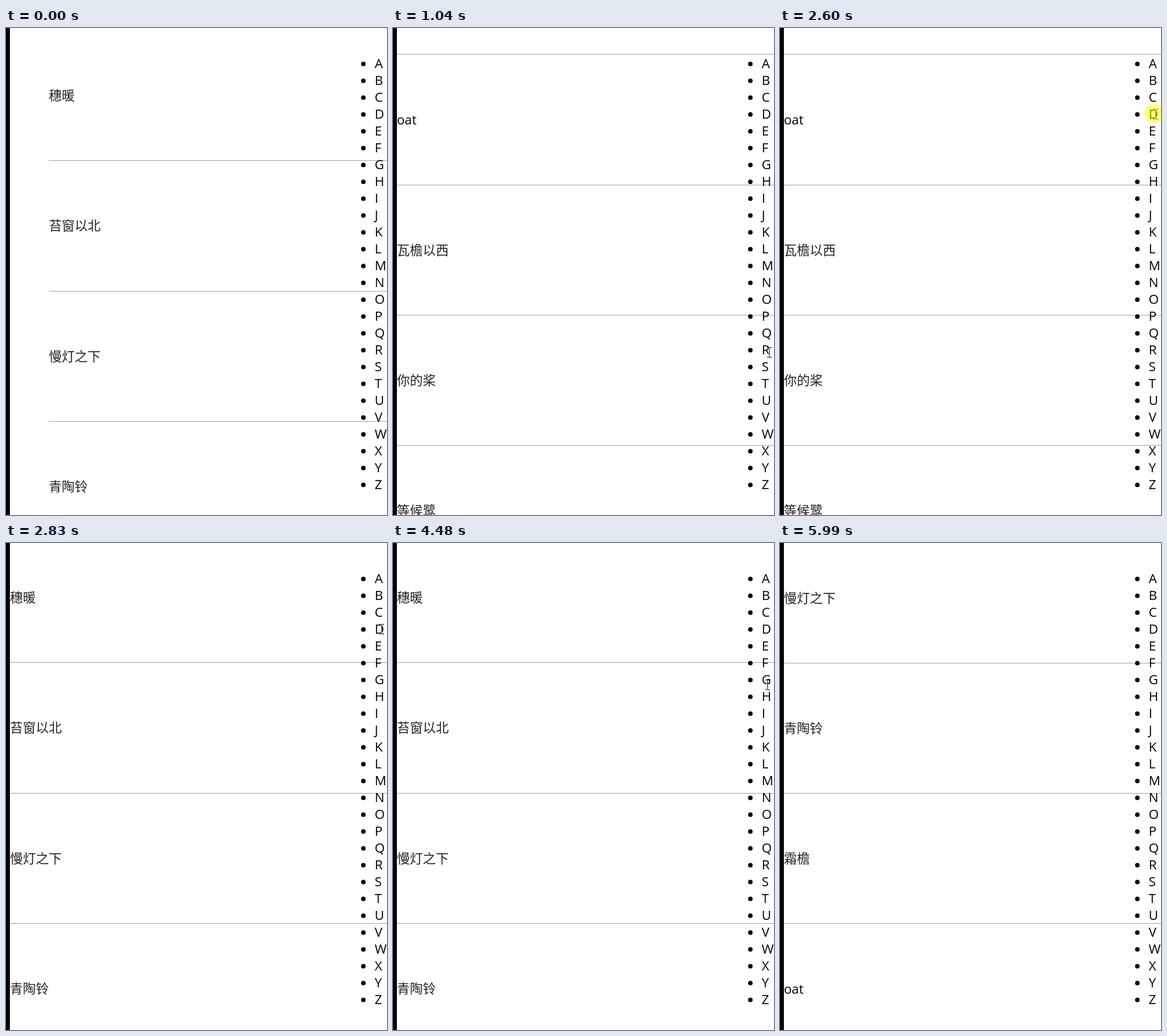
An HTML page that plays this animation: 588 by 752 pixels, repeating every 6290 ms.

```html
<!DOCTYPE html>
<html lang="zh-CN">
<head>
<meta charset="utf-8">
<title>Song index</title>
<style>
  html, body { margin: 0; width: 100%; height: 100%; overflow: hidden; background: #fff; }
  svg { display: block; width: 588px; height: 752px; }
  text { font: 20px "Open Sans", "Noto Sans CJK SC", "Noto Sans CJK", sans-serif; }
  .title { font-weight: 300; fill: #222; }
  .title:lang(en) { font-weight: 400; fill: #000; }
  .page, .click, .cursor { animation: 6290ms step-end infinite; }
  .page, .click { visibility: hidden; }
  .page0 { animation-name: page0; }
  .page1 { animation-name: page1; }
  .page2 { animation-name: page2; }
  .page3 { animation-name: page3; }
  .click { animation-name: click; fill: #ff0; fill-opacity: .5; }
  .cursor { animation-name: move; }
  .halo { fill: none; stroke: #fff; stroke-width: 2; }

  @keyframes page0 {
    0% { visibility: visible; }
    16.5%, 100% { visibility: hidden; }
  }
  @keyframes page1 {
    0%, 44.96%, 100% { visibility: hidden; }
    16.5% { visibility: visible; }
  }
  @keyframes page2 {
    0%, 82.64%, 100% { visibility: hidden; }
    44.96% { visibility: visible; }
  }
  @keyframes page3 {
    0%, 100% { visibility: hidden; }
    82.64% { visibility: visible; }
  }
  @keyframes click {
    0%, 16.5%, 44.96%, 82.64%, 100% { visibility: hidden; }
    14.12%, 41.3%, 79.94% { visibility: visible; }
  }
  @keyframes move {
    0% { transform: translate(700px, 501px); }
    5.37% { transform: translate(583.5px, 501px); }
    6.65% { transform: translate(582.5px, 503px); }
    9.03% { transform: translate(580.5px, 502px); }
    11.73% { transform: translate(580.5px, 501px); }
    23.81% { transform: translate(700px, 501px); }
    /* back in from the right edge */
    29.06% { transform: translate(588.5px, 210px); animation-timing-function: steps(4, start); }
    33.72% { transform: translate(585.5px, 124px); }
    35.26% { transform: translate(581.5px, 132px); }
    37.64% { transform: translate(580.5px, 132px); }
    38.92% { transform: translate(579.5px, 133px); }
    53.7% { transform: translate(578.5px, 133px); }
    /* down to G, past it and back */
    56.09% { transform: translate(578.5px, 133px); animation-timing-function: steps(8, start); }
    66.26% { transform: translate(576.5px, 216px); animation-timing-function: steps(3, start); }
    69.96% { transform: translate(576.5px, 233px); animation-timing-function: steps(2, start); }
    72.42% { transform: translate(577.5px, 219px); }
    73.89% { transform: translate(577.5px, 219px); animation-timing-function: steps(3, start); }
    77.47% { transform: translate(578.5px, 236px); }
    /* out at the bottom */
    87.4% { transform: translate(578.5px, 236px); animation-timing-function: steps(3, start); }
    91.3% { transform: translate(560.5px, 420px); animation-timing-function: steps(3, start); }
    95.19% { transform: translate(516.5px, 745px); }
    95.2%, 100% { transform: translate(700px, 800px); }
  }
</style>
</head>
<body>
<svg viewBox="0 0 588 752">
  <g id="pages"></g>
  <g id="letters"></g>
  <rect width="6" height="752"/>
  <g class="cursor">
    <path class="halo" d="M0-7V7"/>
    <path shape-rendering="crispEdges"
      d="M-3.5-8h3v1h-3zM.5-8h3v1h-3zM-.5-7h1V7h-1zM-3.5 7h3v1h-3zM.5 7h3v1h-3z"/>
    <circle class="click" cx="-2.5" cy="-1" r="15"/>
  </g>
</svg>
<script>
  const PITCH = 201.3;
  const songs = ["穗暖", "苔窗以北", "慢灯之下", "青陶铃", "霜檐", "oat", "瓦檐以西", "你的桨", "等候鹭"];
  const views = [
    { first: 0, x: 66, line: 204.3 },
    { first: 5, x: 6, line: 241.6 },
    { first: 0, x: 6, line: 184.3 },
    { first: 2, x: 6, line: 184.7 }
  ];

  function add(parent, name, attrs, text = "") {
    const node = document.createElementNS("http://www.w3.org/2000/svg", name);
    for (const key in attrs) node.setAttribute(key, attrs[key]);
    node.textContent = text;
    return parent.appendChild(node);
  }

  views.forEach(({ first, x, line }, i) => {
    const page = add(document.getElementById("pages"), "g", { class: `page page${i}` });
    const rule = y => add(page, "rect", { x, y: Math.round(y), width: 588 - x, height: 1, fill: "#aaa" });
    // the first song has no rule above it
    if (first > 0) rule(line - PITCH);
    songs.slice(first, first + 4).forEach((song, row) => {
      const y = line + row * PITCH;
      const lang = /[a-z]/.test(song) ? "en" : "zh-CN";
      add(page, "text", { class: "title", lang, x, y: Math.round(y - 99.15) + 7 }, song);
      rule(y);
    });
  });

  const list = document.getElementById("letters");
  [..."ABCDEFGHIJKLMNOPQRSTUVWXYZ"].forEach((letter, i) => {
    add(list, "circle", { cx: 551.5, cy: 55.5 + i * 26, r: 3.5 });
    add(list, "text", { x: 569, y: 62 + i * 26 }, letter);
  });
</script>
</body>
</html>
```
